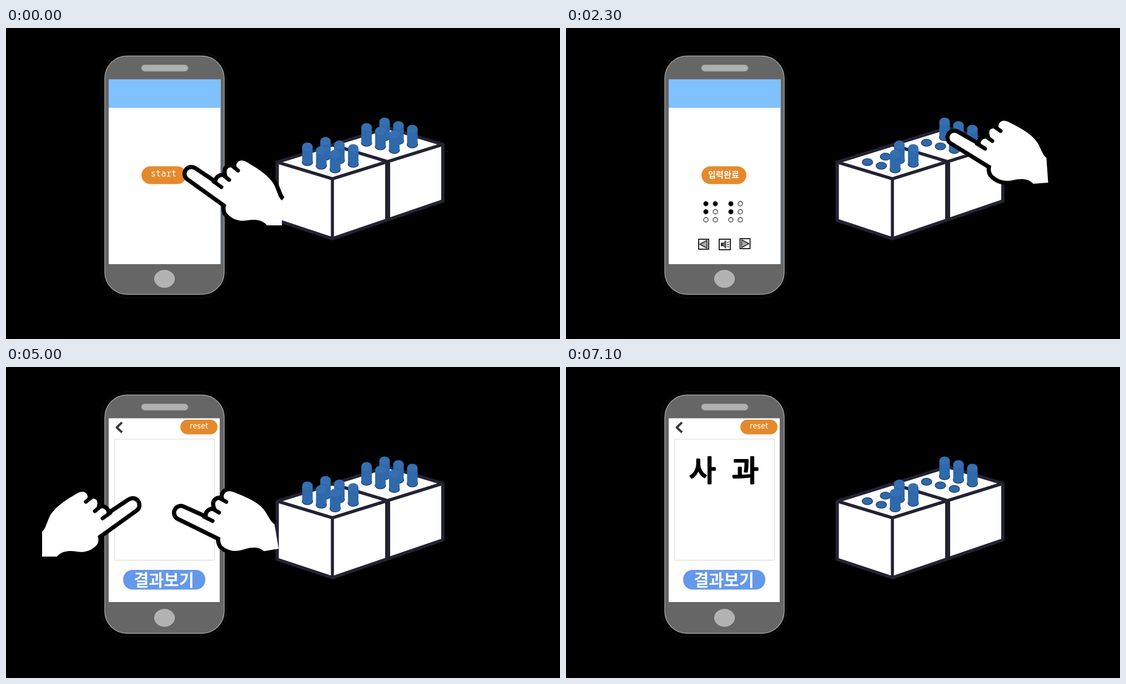
Write an HTML page with a canvas that moves like this. It is 998 by 561 pixels and loops after 8 s.

```html
<!DOCTYPE html>
<html lang="ko">
<head>
<meta charset="utf-8">
<style>
html, body { margin: 0; width: 100%; height: 100%; overflow: hidden; background: #000; }
canvas { display: block; width: 100vw; height: 100vh; }
</style>
</head>
<body>
<canvas id="stage" width="998" height="561"></canvas>
<script>
const ctx = document.getElementById('stage').getContext('2d');
const LOOP = 8000, STEP = 100;
const FIRST_PIN = 400, PIN_TIME = 365, PRESS_DELAY = 100;
const ORANGE = '#e58a2c', EDGE = '#222233', INK = '#222';
const KOREAN = '"Noto Sans CJK KR", sans-serif';
const BUTTON = [334, 263, 0], WRITING = [315, 263, -9.5];

// Pressing order as cell, column, row
const order = ['000', '001', '010', '100', '101', '102'];
const pins = [];
for (let cell = 0; cell < 2; cell++)
  for (let col = 0; col < 2; col++)
    for (let row = 0; row < 3; row++)
      pins.push({
        x: 543 + 106.5 * cell + 32.5 * col + 25 * row,
        y: 242 - 35 * cell - 10 * col + 6.5 * row,
        dotX: 252 + 45 * cell + 17 * col,
        dotY: 317 + 14.5 * row,
        turn: order.indexOf(`${cell}${col}${row}`)
      });
pins.sort((a, b) => a.y - b.y);
const route = order.map((_, i) => pins.find(pin => pin.turn === i));

// Hand drawn around its fingertip
const outline = 'M136 93C128 82 112 82 100 84C84 87 70 80 63 70Q60 62 63 56L-5 7A8.5 8.5 0 0 1 5 -7'
  + 'L50 23Q43 12 51 7Q57 3 68 12Q60 -5 66 -10Q73 -15 84 -5Q77 -18 86 -23Q92 -26 100 -21'
  + 'C122 -8 142 5 150 22C156 36 157 43 163 48';
const handEdge = new Path2D(outline);
const handFill = new Path2D(outline + 'V93Z');
const handCreases = new Path2D('M40 14L54 24M57 2L68 11M74 -14L84 -6');

const clamp = v => Math.min(1, Math.max(0, v));

function glide(from, to, start, end, t) {
  const f = clamp((t - start) / (end - start));
  return from.map((v, i) => v + (to[i] - v) * f);
}

function paint(fill, stroke, width = 1) {
  if (fill) { ctx.fillStyle = fill; ctx.fill(); }
  if (stroke) { ctx.strokeStyle = stroke; ctx.lineWidth = width; ctx.stroke(); }
}

function line(points, stroke, width, fill) {
  ctx.beginPath();
  points.forEach(([x, y]) => ctx.lineTo(x, y));
  if (fill) ctx.closePath();
  paint(fill, stroke, width);
}

function box(x, y, w, h, r, fill, stroke, width) {
  ctx.beginPath();
  ctx.roundRect(x, y, w, h, r);
  paint(fill, stroke, width);
}

function oval(x, y, rx, ry, fill, stroke, width) {
  ctx.beginPath();
  ctx.ellipse(x, y, rx, ry, 0, 0, Math.PI * 2);
  paint(fill, stroke, width);
}

function label(text, x, y, font, color = '#fff') {
  ctx.font = font;
  ctx.fillStyle = color;
  ctx.fillText(text, x, y);
}

function pressed(pin, t) {
  if (pin.turn < 0) return 0;
  if (t >= 4400) return clamp((t - 6800) / 300);
  return t >= FIRST_PIN + PRESS_DELAY + PIN_TIME * pin.turn ? 1 : 0;
}

const above = pin => [pin.x, pin.y - 34, -4];
const tap = t => Math.abs(Math.sin((t - 5800) / 400 * Math.PI));

function pinHand(t) {
  const i = Math.floor((t - FIRST_PIN) / PIN_TIME);
  if (i < 0) return glide(BUTTON, above(route[0]), 200, FIRST_PIN, t);
  if (i >= route.length) return above(route.at(-1));
  const start = FIRST_PIN + i * PIN_TIME;
  const pose = glide(above(route[i]), above(route[i + 1] || route[i]), start + 180, start + PIN_TIME, t);
  pose[1] += 12 * Math.sin(Math.PI * clamp((t - start) / 180));
  return pose;
}

function rightHand(t) {
  if (t < 2700) return pinHand(t);
  if (t < 3500) return glide([650, 367, 0], BUTTON, 2700, 3080, t);
  if (t < 4400 || t >= 6700) return null;
  if (t < 4800) return glide([425, 291, 0], BUTTON, 4400, 4600, t);
  if (t < 6200) return [WRITING[0], WRITING[1] - 80 * tap(t), WRITING[2]];
  return glide(WRITING, [277, 398, -9.5], 6200, 6600, t);
}

function leftHand(t) {
  return t >= 4800 && t < 6200 ? [228 - 12 * tap(t), 249 - 90 * tap(t), 0] : null;
}

function drawHand(pose, flip = 1) {
  if (!pose) return;
  ctx.save();
  ctx.translate(pose[0], pose[1]);
  ctx.scale(flip, 1);
  ctx.rotate(pose[2] * Math.PI / 180);
  ctx.strokeStyle = '#000';
  ctx.lineWidth = 15;
  ctx.stroke(handEdge);
  ctx.fillStyle = '#fff';
  ctx.fill(handFill);
  ctx.lineCap = 'round';
  ctx.lineWidth = 7;
  ctx.stroke(handCreases);
  ctx.restore();
}

function phone() {
  box(172, 44.5, 226, 442, 46, null, '#111');
  box(178, 50.5, 215, 430, 40, '#666', '#a0a0a0', 1.5);
  box(244, 66.5, 84, 11.5, 6, '#b0b0b0', '#989898');
  oval(285.5, 452.5, 18, 15.5, '#b2b2b2', '#c4c4c4');
}

function arrow(x, y, dir) {
  box(x - 9, y - 9, 18, 18, 0, '#fff', INK, 2);
  line([[x + 7 * dir, y], [x - 6 * dir, y - 7], [x - 6 * dir, y + 7]], INK, 1.5, '#aaa');
}

function speaker(x, y) {
  box(x - 10, y - 9.5, 20, 19, 0, '#fff', INK, 2);
  box(x - 7, y - 3, 5, 6, 0, INK);
  line([[x - 5, y], [x + 2, y - 7], [x + 2, y + 7]], INK, 1, '#666');
  for (const d of [-1, 0, 1]) line([[x + 4, y + d * 3], [x + 7.5, y + d * 5]], INK, 1.3);
}

function inputScreen(t) {
  box(185, 92.5, 202, 333.5, 0, '#80c1ff');
  box(185, 144, 201, 282, 0, '#fff');
  box(244, 249.5, 81, 32, 16, ORANGE);
  if (t < 200 || t >= 4400) return label('start', 284, 264, '500 15.6px "Noto Sans Mono", monospace');
  label('입력완료', 284, 264, `700 15.2px ${KOREAN}`);
  for (const pin of pins) oval(pin.dotX, pin.dotY, 4, 4, pressed(pin, t) ? '#000' : '#fff', '#333', 1.3);
  arrow(248, 390, -1);
  speaker(286, 390.5);
  arrow(322.5, 389, 1);
}

function written(text, x) {
  ctx.strokeStyle = '#000';
  ctx.lineWidth = 3;
  label(text, x, 186, `500 52px ${KOREAN}`, '#000');
  ctx.strokeText(text, x, 186);
}

function writeScreen(t) {
  box(185, 92.5, 200, 331.5, 0, '#fff');
  line([[209, 100], [199.5, 109], [209, 118]], '#3a3a40', 4);
  box(314, 95, 67, 26.5, 13, ORANGE);
  label('reset', 347.5, 107, '14px "Noto Sans", sans-serif');
  box(195.5, 130, 180, 218.5, 0, null, '#d6d6d6');
  box(211, 366, 148, 35.5, 17, '#6498ea');
  label('결과보기', 284.5, 384, `700 29.5px ${KOREAN}`);
  if (t >= 5200) written(t < 5500 ? 'ㅅ' : '사', 246);
  if (t >= 5700) written(t < 6000 ? 'ㄱ' : '과', t < 6000 ? 314 : 323);
}

// Corner of the double block: across, back, down
function corner(u, v, h = 0) {
  return [488.5 + 99.5 * u + 99.5 * v, 242 + 30 * u - 31 * v + h * (105 + 3 * u - 3 * v)];
}

function blocks(t) {
  const rim = [corner(0, 2), corner(1, 2), corner(1, 2, 1), corner(1, 0, 1), corner(0, 0, 1), corner(0, 0)];
  line(rim, EDGE, 6, '#fff');
  line([corner(0, 0), corner(1, 0), corner(1, 2)], EDGE, 6);
  line([corner(1, 0), corner(1, 0, 1)], EDGE, 5.5);
  line([corner(0, 1), corner(1, 1)], EDGE, 6);
  line([corner(1, 1), corner(1, 1, 1)], EDGE, 9);
  for (const pin of pins) {
    const height = 28 * (1 - pressed(pin, t));
    oval(pin.x, pin.y, 9.5, 6.5, '#2f69ab', '#1f3563', 1.2);
    if (!height) continue;
    box(pin.x - 9.5, pin.y - height, 19, height, 0, '#2f69ab');
    oval(pin.x, pin.y - height, 9.5, 7.5, '#356fb2');
  }
}

function draw(t) {
  ctx.fillStyle = '#000';
  ctx.fillRect(0, 0, 998, 561);
  ctx.textAlign = 'center';
  ctx.textBaseline = 'middle';
  ctx.lineJoin = 'round';
  phone();
  if (t < 4800) inputScreen(t); else writeScreen(t);
  blocks(t);
  drawHand(rightHand(t));
  drawHand(leftHand(t), -1);
}

function frame() {
  const t = performance.now() % LOOP;
  draw(Math.floor(t / STEP) * STEP);
  requestAnimationFrame(frame);
}
frame();
</script>
</body>
</html>
```
